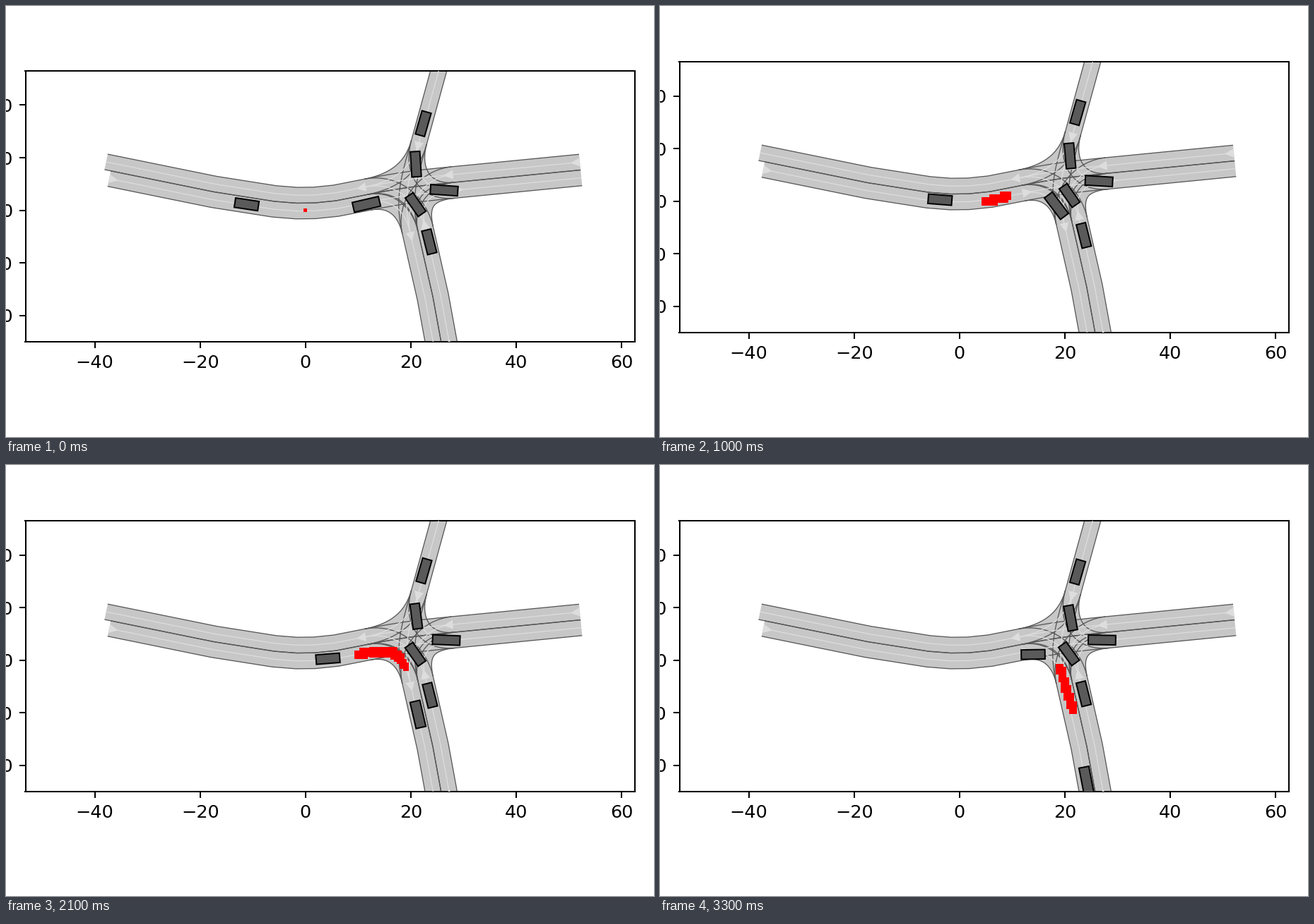
A matplotlib script that plays this animation: 917x611 px, repeating every 3400 ms.

```python
import numpy as np
import matplotlib.pyplot as plt
from matplotlib.animation import FuncAnimation
from matplotlib.collections import LineCollection, PolyCollection
from matplotlib.patches import Polygon

W, H, DPI = 917, 611, 128
FRAMES, INTERVAL = 34, 100
HALF = 1.5  # half a lane
PT = 183.4 / 72  # stage pixels per typographic point


def px(n):
    """Pixels to points."""
    return n * 72 / DPI


plt.rcParams.update({
    "font.family": "DejaVu Sans",
    "font.size": px(10 * PT),
    "axes.linewidth": px(0.8 * PT),
    **{f"{a}tick.major.{k}": px(v * PT) for a in "xy"
       for k, v in (("size", 3.5), ("width", 0.8), ("pad", 3.5))},
})


# --- road network ---------------------------------------------------------

def tangents(pts):
    t = np.gradient(pts, axis=0)
    return t / np.linalg.norm(t, axis=1, keepdims=True)


def offset(pts, d):
    t = tangents(pts)
    return pts + d * np.column_stack([-t[:, 1], t[:, 0]])


def road(*mid):
    """Right-hand lane along the middle line and left-hand lane against it."""
    mid = np.array(mid, float)
    return offset(mid, -HALF), offset(mid, HALF)[::-1]


def connect(a, b, k=0.4):
    """Cubic curve from the end of lane a to the start of lane b."""
    p0, p3 = a[-1], b[0]
    d = k * np.linalg.norm(p3 - p0)
    p1, p2 = p0 + d * tangents(a)[-1], p3 - d * tangents(b)[0]
    t = np.linspace(0, 1, 30)[:, None]
    return ((1 - t)**3 * p0 + 3 * t * (1 - t)**2 * p1
            + 3 * t**2 * (1 - t) * p2 + t**3 * p3)


def arrow(pts):
    d = tangents(pts)[0]
    n = 0.85 * np.array([-d[1], d[0]])
    return np.array([pts[0] + n, pts[0] - n, pts[0] + 1.75 * d])


w_in, w_out = road((-37.6, 7.6), (-17.4, 3.5), (-5.9, 1.69), (-1.7, 1.36),
                   (1.7, 1.4), (5.8, 1.82), (11.7, 2.98))
w_in[0], w_out[-1] = (-37.27, 6.02), (-37.85, 9.2)
e_out, e_in = road((28.1, 5.3), (52.2, 7.66))
s_out, s_in = road((21.3, -3.85), (24.15, -16.4), (26, -26.5))
n_in = np.array([(26.35, 30.5), (21.54, 12.95)])

lanes = [
    w_in, w_out, e_in, e_out, s_in, s_out, n_in,
    connect(w_in, s_out, 0.45), connect(w_in, e_out),
    connect(e_in, w_out), connect(e_in, s_out),
    connect(n_in, w_out), connect(n_in, s_out), connect(n_in, e_out, 0.5),
    connect(s_in, w_out), connect(s_in, e_out, 0.55),
]
left = [offset(c, HALF) for c in lanes]
right = [offset(c, -HALF) for c in lanes]


# --- traffic: each car has a pose (x, y, heading) over time ---------------

def keyed(*rows):
    f, *pose = np.array(rows).T
    return lambda i: [np.interp(i, f, p) for p in pose]


def drift(pose, delta, ease):
    return lambda i: np.array(pose) + np.array(delta) * ease(i)


def there_and_back(i):
    return (i / 20 - 1)**2


def creep(power):
    return lambda i: (i / (FRAMES - 1))**power


cars = [
    (4.5, 1.8, keyed((0, -11.18, 1.13, -8.5), (6, -6.89, 0.62, -6),
                     (14, -0.52, -0.05, -3), (21, 4.24, 0.28, 4.5),
                     (33, 13.96, 1.09, 1))),
    (5.1, 1.9, keyed((0, 11.55, 1.13, 13), (3, 13.7, 1.53, 5),
                     (6, 15.97, 1.35, -20), (10, 18.38, -0.86, -53),
                     (14, 19.79, -3.88, -75), (21, 21.33, -10.31, -77),
                     (26, 22.54, -15.27, -79), (33, 24.08, -22.85, -79))),
    (4.6, 1.8, drift((22.47, 16.98, -106), (-0.13, -0.5, 0), there_and_back)),
    (4.6, 1.8, drift((23.61, -6.68, -76), (-0.13, 0.68, 0), there_and_back)),
    (4.8, 1.8, drift((20.93, 8.77, -86.5), (0.14, -0.75, 7), creep(1.3))),
    (5.2, 1.8, drift((26.3, 3.81, -4), (0.73, 0.03, 3), creep(1.3))),
    (4.3, 1.8, drift((20.88, 1.08, -55), (-0.12, 0.14, 1), creep(3))),
]


def car_box(i, length, width, pose):
    x, y, a = pose(i)
    a = np.radians(a)
    d = np.array([np.cos(a), np.sin(a)])
    u, v = d * length / 2, np.array([-d[1], d[0]]) * width / 2
    return np.array([u + v, u - v, -u - v, v - u]) + (x, y)


# --- reachable area: squares snapped to a grid along a path ---------------

path = np.array([(0, 0), (5.65, 0.1), (11.15, 1.3), (16.4, 1.7), (17.7, 0.6),
                 (19.05, -1.4), (20.4, -5.95), (21.65, -9.45)])
dist = np.r_[0, np.cumsum(np.hypot(*np.diff(path, axis=0).T))]

key = [0, 1, 6, 14, 21, 26, 33]
tail = [0, 0.75, 4.2, 5.85, 9.9, 14.3, 20.5]
head = [0, 0.75, 4.5, 14.05, 20.8, 23.4, 29.2]


def reach(i):
    a, b = np.interp(i, key, tail), np.interp(i, key, head)
    v = np.linspace(0, 1, max(1, int((b - a) / 0.25) + 1))
    s = a + v * (b - a)
    # widest in the middle while crossing the bend
    bulge = np.exp(-((i - 23.5) / 5)**2)
    r = (np.interp(i, [1, 6, 33], [0.34, 0.82, 0.74])
         + bulge * np.interp(v, [0, 0.5, 1], [0, 0.36, -0.33]))
    g = np.interp(i, [1, 6], [0.05, 0.5])
    x, y = (np.round(np.interp(s, dist, p) / g) * g for p in path.T)
    return [[(p - q, o - q), (p + q, o - q), (p + q, o + q), (p - q, o + q)]
            for p, o, q in zip(x, y, r)]


# --- figure ---------------------------------------------------------------

fig = plt.figure(figsize=(W / DPI, H / DPI), dpi=DPI, facecolor="white")
ax = fig.add_axes([0, 0, 1, 1])
ax.set(xlim=(-53.16, 62.44), ylim=(-25, 26.5),
       xticks=range(-40, 61, 20), yticks=range(-20, 21, 10))


def fill(polys, color, z):
    return ax.add_collection(PolyCollection(
        polys, facecolor=color, edgecolor="none", zorder=z), autolim=False)


def lines(paths, color, z):
    ax.add_collection(LineCollection(
        paths, colors=color, linewidths=px(0.5 * PT), zorder=z),
        autolim=False)


fill([np.vstack([a, b[::-1]]) for a, b in zip(left, right)], "#c7c7c7", 1)
lines(left + right, "#555555", 2)
lines(lanes, "#dddddd", 3)
fill([arrow(c) for c in lanes], "#dddddd", 4)
area = fill(reach(0), "red", 5)
boxes = [ax.add_patch(Polygon(car_box(0, *c), facecolor="#5a5a5a",
                              edgecolor="black", linewidth=px(2), zorder=6))
         for c in cars]


def update(i):
    # the axes jump upwards once, after the first picture
    bottom = 135 if i == 0 else 147.9
    ax.set_position([27.5 / W, bottom / H, 862 / W, 384 / H])
    area.set_verts(reach(i))
    for box, car in zip(boxes, cars):
        box.set_xy(car_box(i, *car))
    return [area, *boxes]


anim = FuncAnimation(fig, update, frames=FRAMES, interval=INTERVAL,
                     repeat=True, repeat_delay=0, blit=False,
                     cache_frame_data=False)
plt.show()
```
